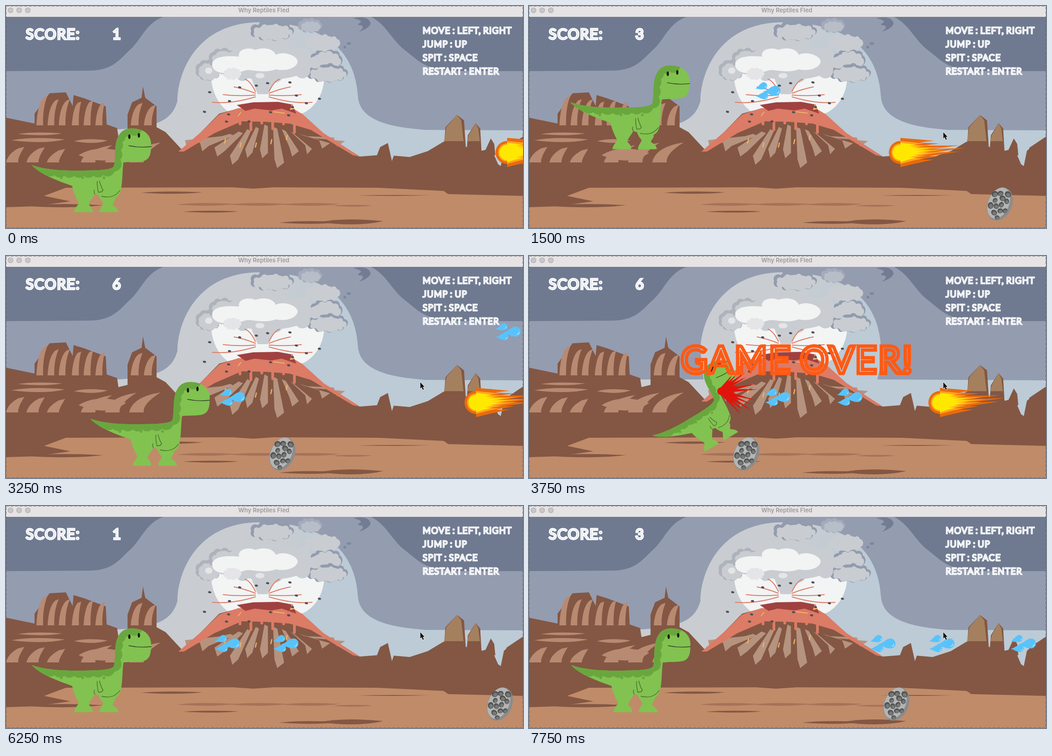
Write an HTML page with a canvas that moves like this. It is 1140 by 491 pixels and loops after 8 s.

```html
<!DOCTYPE html>
<html lang="en">
<head>
<meta charset="utf-8">
<title>Why Reptiles Fled</title>
<style>
html, body { margin: 0; width: 100%; height: 100%; overflow: hidden; }
canvas { display: block; }
</style>
</head>
<body>
<canvas id="stage" width="1140" height="491"></canvas>
<script>
const W = 1140, H = 491, LOOP = 8000, STEP = 250;
const HIT = 2750, DEATH = 3750, RESTART = 5250;
const stage = document.getElementById('stage').getContext('2d');
const newLayer = () => Object.assign(document.createElement('canvas'), { width: W, height: H }).getContext('2d');
const ink = newLayer();
let g = stage;

// Repeatable noise in 0..1.
const noise = n => Math.abs(Math.sin(n * 127.1 + 3.7) * 4375.85) % 1;
const times = (n, draw) => { for (let i = 0; i < n; i++) draw(i); };

function fill(color, path) {
  g.fillStyle = color;
  g.fill(new Path2D(path));
}
function line(color, width, path) {
  g.strokeStyle = color;
  g.lineWidth = width;
  g.lineCap = g.lineJoin = 'round';
  g.stroke(new Path2D(path));
}
function oval(color, x, y, rx, ry = rx, turn = 0) {
  g.fillStyle = color;
  g.beginPath();
  g.ellipse(x, y, rx, ry, turn, 0, 7);
  g.fill();
}
function at(x, y, size, draw, turn = 0) {
  g.save();
  g.translate(x, y);
  g.rotate(turn);
  g.scale(size, size);
  draw();
  g.restore();
}

// Linear interpolation through [time, value] points, clamped at both ends.
function track(t, points) {
  let [t0, v0] = points[0];
  for (const [t1, v1] of points) {
    if (t < t1) return t1 > t0 ? v0 + (v1 - v0) * (t - t0) / (t1 - t0) : v0;
    [t0, v0] = [t1, v1];
  }
  return v0;
}

// Heavy capitals with a thin line cut out along the middle of each stroke.
function inlineText(text, x, y, size, color, cut = 0.55) {
  const stroke = width => {
    ink.lineWidth = size * width;
    ink.strokeText(text, x, y);
  };
  ink.clearRect(0, 0, W, H);
  ink.font = `300 ${size}px Lato, sans-serif`;
  ink.letterSpacing = size * 0.088 + 'px';
  ink.wordSpacing = size * -0.13 + 'px';
  ink.miterLimit = 3;
  ink.fillStyle = ink.strokeStyle = color;
  stroke(0.17);
  ink.fillText(text, x, y);
  ink.globalCompositeOperation = 'destination-out';
  ink.globalAlpha = cut;
  ink.fillText(text, x, y);
  ink.globalCompositeOperation = 'source-over';
  ink.globalAlpha = 1;
  stroke(0.025);
  g.drawImage(ink.canvas, 0, 0);
}

function sky(round) {
  fill('#949cb0', 'M0 0H1140V491H0Z');
  fill('#6f7a91', 'M0 24H347C305 40 300 75 270 100C245 125 230 143 180 143L0 144ZM805 24C840 42 850 75 880 98C915 125 925 144 1010 144H1140V24Z');
  const light = g.createLinearGradient(640, 0, 740, 60);
  light.addColorStop(0, '#c9cdd1');
  light.addColorStop(1, '#bccbd6');
  const dome = 'C378 150 418 36 560 36C735 36 772 130 776 200';
  fill(light, round
    ? `M240 273H385L378 210${dome}Q778 240 768 273L1140 275V365H240Z`
    : `M240 273C345 270 368 245 378 210${dome}C780 255 850 268 925 274L1140 275V365H240Z`);
}

// A ring of puffs around a solid middle.
function cloud(color, x, y, rx, ry) {
  oval(color, x, y, rx * 0.85, ry * 0.85);
  times(9, i => {
    const a = i * 0.7, r = ry * (0.3 + 0.18 * noise(i + x));
    oval(color, x + (rx - r) * Math.cos(a), y + (ry - r) * Math.sin(a), r);
  });
}
function edgedCloud(edge, core, x, y, rx, ry) {
  cloud(edge, x, y, rx, ry);
  cloud(core, x + 2, y + 3, rx - 5, ry - 4);
}

function smoke() {
  const dim = '#939bae', soft = '#c9cdd1', pale = '#e5e5e7';
  fill('#f3f4f4', 'M452 150H702C703 195 680 225 655 237H495C470 222 452 190 452 150Z');
  edgedCloud('#aeb3bb', soft, 446, 142, 29, 24);
  edgedCloud('#aeb3bb', soft, 478, 118, 32, 26);
  edgedCloud(dim, soft, 706, 120, 36, 28);
  edgedCloud(dim, soft, 708, 148, 46, 22);
  cloud(soft, 575, 125, 120, 45);
  fill(soft, 'M540 158L600 155L577 195H555Z');
  cloud(soft, 697, 82, 40, 20);
  edgedCloud(dim, soft, 586, 55, 49, 23);
  edgedCloud('#a4abba', '#b8bec8', 670, 43, 27, 17);
  fill('#727d94', 'M765 27Q800 20 804 39Q800 50 778 57Q792 47 784 43Q770 42 781 37Q788 32 765 27Z');
  times(2, i => oval('#7d879d', 756 - 9 * i, 83 + 8 * i, 5 - 2 * i, 3));
  fill('#f2f3f3', 'M455 133C452 115 475 108 514 112C510 95 535 90 550 97C570 90 590 95 595 108C615 98 645 112 643 124C640 138 615 145 595 140C570 150 545 140 530 142C505 150 460 155 455 133Z');
  cloud(pale, 499, 150, 20, 14);
  oval(pale, 560, 154, 10, 6);
  oval(pale, 447, 143, 8, 7);
}

// Lens-shaped streak starting at its left end.
function streak(color, x, y, w, h) {
  fill(color, `M${x} ${y}Q${x + w * 0.4} ${y - h} ${x + w} ${y - h * 0.2}Q${x + w * 0.6} ${y + h} ${x} ${y}Z`);
}

// Light vertical flutes that widen towards a flat base.
function flutes(x, w, top, base, n, lean) {
  times(n, i => {
    const left = x + w * i / n, step = w / n, tip = left + step * (0.5 + lean), y = top + 14 * noise(i + x);
    fill('#b98a72', `M${left} ${base}Q${left + step * 0.1} ${y + 12} ${tip} ${y}L${tip + step * 0.3} ${y - 3}Q${left + step * 0.55} ${y + 22} ${left + step * 0.6} ${base}Z`);
  });
}

function spire(x, w, top, cap) {
  const shape = (a, b, base) => `M${x + a} ${base}L${x + a + w * 0.1} ${top + 27}L${x + w * 0.6} ${top}L${x + b - w * 0.1} ${top + 12}L${x + b} ${base}Z`;
  fill('#835743', shape(0, w, 330));
  if (cap) fill('#a5805f', shape(2, w * 0.88, 299));
}

function mountains() {
  const rock = '#835743', lava = '#dc7b66', glow = '#efb568';
  fill(rock, 'M0 247L63 260V238L96 193L132 191L147 221L149 197L172 204L220 222L222 262L245 270L248 290L268 285V240L278 213L299 203L302 178L307 203L332 222V268L352 279L390 320L470 238L515 226H630L700 282L780 333L818 330L825 312L842 303L851 343L855 331L890 334L930 321L965 300L1050 320L1070 315L1085 350L1091 354L1098 320L1140 290V450H0Z');
  spire(964, 51, 241, true);
  spire(1015, 34, 259, true);
  spire(1054, 25, 293);
  spire(1096, 80, 286);

  flutes(67, 74, 199, 264, 3, 0.2);
  flutes(145, 78, 212, 264, 3, 0);
  flutes(275, 58, 214, 264, 2, 0.1);
  flutes(0, 135, 308, 346, 3, 0.1);
  flutes(165, 160, 304, 346, 3, 0.5);
  times(2, i => streak('#b98a72', 12 + 14 * i, 297 - 14 * i, 118 - 20 * i, 9 - 3 * i));
  streak('#b98a72', 160, 330, 105, 26);
  streak('#b98a72', 150, 299, 74, 8);

  // Ridges fan out from the crater.
  times(11, i => {
    const k = i / 5 - 1, w = 9 + 9 * noise(i), x = 570 + k * 95, y = 262 + 26 * Math.abs(k), foot = 565 + k * 165, low = 362 - 35 * k * k - 26 * noise(i + 5);
    fill('#b6937f', `M${x} ${y}L${x + w * 0.6} ${y + 4}L${foot + w} ${low - 12}L${foot} ${low}L${foot - w * 0.4} ${low - 20}Z`);
  });
  fill(lava, 'M380 322L432 277L470 240L512 226H632L655 240L700 281L780 333L765 330L672 274L625 260L570 256L520 255L460 281L392 322Z');
  times(6, i => line(lava, 6, `M${516 + 24 * i} 254v${[4, 34][i % 2] * noise(i + 2) + 4}`));
  fill('#a04140', 'M509 219L545 213L600 212L632 218L640 238L608 227L585 231L548 227L528 232Z');
  fill(glow, 'M626 230L630 217L636 228Z');
  times(5, i => line(glow, 2.5, `M${484 + 34 * i} ${294 + 10 * Math.sin(i)}l-2 9`));
  line(glow, 2, 'M590 234L614 237M512 243L518 235');

  // Sparks arc out on both sides, cinders hang around them.
  for (const side of [-1, 1])
    times(4, i => {
      const x = 565 + side * (38 + 24 * i), y = 162 + 17 * i;
      line(lava, 2, `M${565 + side * 15} ${189 + 4 * i}Q${565 + side * (26 + 14 * i)} ${y + 4} ${x} ${y}`);
    });
  times(16, i => {
    const a = i * 2.4, r = 0.35 + 0.65 * noise(i);
    oval('#4d5056', 566 + 145 * r * Math.cos(a), 215 + 52 * r * Math.sin(a), 3.6, 2.3, 0.2);
  });
}

function ground() {
  const dark = '#835743', mid = '#a5725a';
  fill('#c08b69', 'M0 445L62 443L142 432L84 420L132 402L500 401L545 404L590 401L820 402L965 409L975 416L1140 420V491H0Z');
  streak(dark, 298, 413, 135, 5);
  streak(dark, 40, 442, 174, 7);
  streak(dark, 390, 455, 122, 4);
  streak(dark, 774, 419, 162, 2);
  streak(dark, 602, 479, 135, 6);
  streak(dark, 690, 478, 142, 11);
  times(3, i => streak(mid, 376 + 115 * i, 439, 130, 6));
  streak(mid, 720, 442, 88, 4);
}

function windowBar() {
  fill('#e6e3e5', 'M0 0H1140V24H0Z');
  times(3, i => {
    oval('#a6a4a6', 10 + 19 * i, 9.5, 6);
    oval('#c9c7c9', 10 + 19 * i, 9.5, 5);
  });
  g.font = '600 13px Inter, sans-serif';
  g.textAlign = 'center';
  g.fillStyle = '#9b999b';
  g.fillText('Why Reptiles Fled', 568.5, 14);
  g.setLineDash([6, 4]);
  g.lineWidth = 1;
  g.strokeStyle = 'rgba(85,80,80,.65)';
  g.strokeRect(0.5, 0.5, W - 1, H - 1);
  g.setLineDash([]);
}

function labels() {
  inlineText('SCORE:', 44, 73, 30.5, '#fff');
  ['MOVE : LEFT, RIGHT', 'JUMP : UP', 'SPIT : SPACE', 'RESTART : ENTER']
    .forEach((text, i) => inlineText(text, 919, 60.5 + i * 30, 18.8, '#fff'));
}

function scenery(round) {
  g = newLayer();
  sky(round);
  smoke();
  mountains();
  ground();
  windowBar();
  labels();
  const { canvas } = g;
  g = stage;
  return canvas;
}

function dino(dead) {
  const dark = '#69a73e', black = '#16180f';
  const back = 'M57 352C75 358 100 364 150 364C195 364 234 364 238 354C243 335 237 305 249 286C258 270 275 269 290 272';
  const body = back + 'C312 276 320 292 320 305C320 325 318 337 306 342C295 346 275 344 259 346C256 365 258 385 253 408Q250 420 241 424C243 432 232 437 236 441Q247 447 248 456H206C207 446 214 441 214 435Q207 428 204 418L196 416C192 424 182 434 183 440Q192 447 191 456H150C151 445 160 441 160 435Q148 412 146 398C110 385 75 372 57 352Z';
  fill('#82c250', body);
  g.save();
  g.clip(new Path2D(body));
  line(dark, 20, back);
  g.setLineDash([0, 21]);
  line(dark, 32, back);
  g.restore();
  times(3, i => oval(dark, 122 + 47 * i, 380, 3));
  if (dead) fill(black, 'M262 288L279 278L280 292ZM285 282L302 279L298 292Z');
  else times(2, i => oval(black, 272 + 21 * i, 289 - 3 * i, 2.5, 5));
  line('#2c3a22', 1.3, 'M271 309Q294 314 320 311');
  line('#42662a', 1.3, 'M206 387Q210 402 214 407L211 411L204 412Q201 402 201 388M211 421Q238 427 251 408M196 416Q193 412 195 407');
}

function blood() {
  oval('#e0140c', 425, 299, 10, 9);
  times(13, i => {
    const size = 0.35 + 0.65 * noise(i + 4);
    at(422, 299, 1, () => {
      fill('#e0140c', `M0 -5L${85 * size} 0L0 5Z`);
      oval('#e0140c', 70 * size, 0, 2, 1.5);
    }, -0.95 + i * 0.15);
  });
}

// Round head with tongues of fire streaming back.
function flame(color, r, length) {
  oval(color, 27, 0, r);
  for (let i = -3; i <= 3; i++) {
    const y = i * r * 0.3, reach = length * (1 - 0.2 * Math.abs(i) + 0.12 * (i & 1));
    fill(color, `M27 ${y - r * 0.36}Q${27 + reach * 0.5} ${y - r * 0.25} ${27 + reach} ${y * 0.9 - reach * 0.07}Q${27 + reach * 0.5} ${y} 27 ${y + r * 0.36}Z`);
  }
}
function fireball() {
  flame('#ea6a0c', 25.5, 143);
  flame('#ffa51e', 20, 100);
  flame('#ffe800', 17, 68);
}

function drop(x, y, size, turn) {
  at(x, y, size, () => {
    fill('#58c3fb', 'M-28 2C-16 0 -10 -11 0 -11A11 11 0 0 1 0 11C-10 11 -17 6 -28 2Z');
    fill('#d9f3ff', 'M1 7Q7 5 8 -1Q9 7 1 7Z');
  }, turn);
}
function spit() {
  drop(47, 0, 1, 0);
  drop(21, -11, 0.7, -0.25);
  drop(23, 11, 0.72, 0.05);
}

function boulder() {
  at(32, 35, 1, () => {
    oval('#8b8c8c', 0, 0, 27, 38);
    oval('#b3b4b3', -3, -1, 23, 36);
    times(13, i => {
      const a = i * 2.4, r = Math.sqrt((i + 0.4) / 13), x = 22 * r * Math.cos(a), y = 33 * r * Math.sin(a), size = 4.5 + 2 * noise(i);
      oval('#515252', x, y, size, size * 1.15, a);
      oval('#777878', x + 1, y + 1, size * 0.65, size * 0.75, a);
    });
  }, 0.4);
}

function cursor() {
  const arrow = 'M913.5 279V293L916.5 290.5L919 296L921.5 295L919 289.5H923Z';
  line('#fff', 1.6, arrow);
  fill('#111', arrow);
}

// Dino offset: a walk to the right, one parabolic jump in the first round.
function dinoAt(t) {
  if (t >= RESTART) return [track(t, [[6750, 0], [7750, 36]]), 0];
  const air = 1 - ((t - 1450) / 700) ** 2;
  return [track(t, [[750, 0], [1500, 34], [2500, 53], [DEATH, 180]]), air > 0 ? -140 * air : t > 1450 ? 8 : 0];
}

// How far the obstacles have come; the first round gets faster.
const travel = t => t < RESTART
  ? track(t, [[0, 0], [1500, 286], [2500, 519], [DEATH, 845]])
  : 0.186 * (t - RESTART);

const BULLSEYE = 2293;
const SHOTS = [1164, 1558, BULLSEYE, 3244, 3750, 5630, 5951, 6399, 6723];

const plain = scenery(false), final = scenery(true);

function render(time) {
  const first = time < RESTART, over = first && time >= DEATH;
  const t = over ? DEATH : time;
  g.drawImage(over ? final : plain, 0, 0);

  const score = first ? 1 + Math.floor((t + 500) / 750) : Math.floor((t - RESTART) / 750);
  inlineText(score, 235, 73, 30.5, '#fff');

  if (over) {
    at(272, 397, 0.87, () => at(-57, -352, 1, () => dino(true)), -0.54);
    blood();
  } else at(...dinoAt(t), 1, dino.bind(null, false));

  const gone = travel(t);
  if (first) {
    const small = t >= 2250 && t < HIT;
    const x = t < HIT ? 1078 - gone : W + travel(HIT) - gone;
    at(x, small ? 314 : 324, small ? 0.77 : 1, fireball);
  }
  at((first ? 1292 : 1243) - gone, 403, 1, boulder);

  for (const born of SHOTS) {
    if (born < RESTART !== first || t < born || born === BULLSEYE && t >= HIT) continue;
    const [dx, dy] = dinoAt(born);
    at(338 + dx + (first ? 0.416 : 0.4013) * (t - born), 304 + dy, 1, spit);
  }

  if (over) inlineText('GAME OVER!', 336, 257, 76, '#ff5a14', 1);
  if (time >= 500) cursor();
}

let shown = -1;
function tick() {
  const time = Math.floor(performance.now() % LOOP / STEP) * STEP;
  if (time !== shown) render(shown = time);
  requestAnimationFrame(tick);
}
tick();
</script>
</body>
</html>
```
